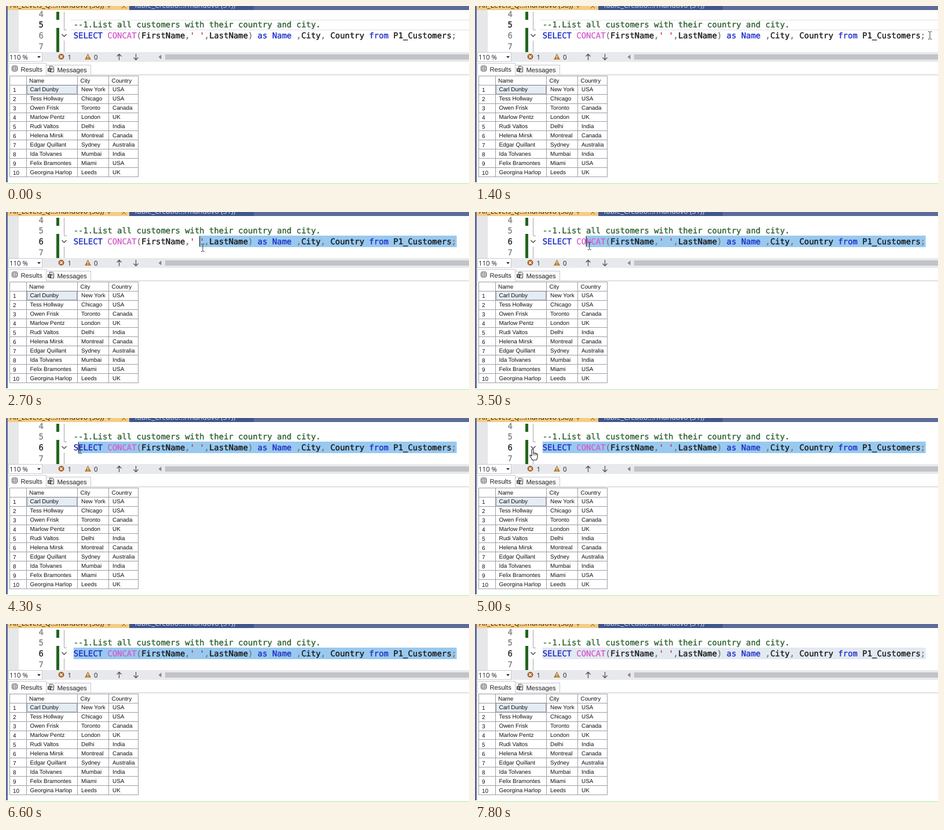
These frames come from a looping animation (800 px wide and 309 px high, 7.9 s). An HTML page:

```html
<!DOCTYPE html>
<html lang="en">
<head>
<meta charset="utf-8">
<title>Query editor</title>
<style>
html, body { margin: 0; width: 100%; height: 100%; overflow: hidden; background: #fff; }
svg { display: block; width: 800px; height: 309px; }
text { white-space: pre; text-rendering: geometricPrecision; }
.code { font: 13.92px "DejaVu Sans Mono", "Noto Sans Mono", monospace; stroke-width: 0.35px; }
.tab { font: 12.4px "Open Sans", "Noto Sans", sans-serif; }
.bar { font: 11.4px "Open Sans", "Noto Sans", sans-serif; fill: #222; }
.grid { font: 9.9px "Liberation Sans", Arial, sans-serif; fill: #111; }
.label { font: 11.2px "Liberation Sans", Arial, sans-serif; fill: #222; }
</style>
</head>
<body>
<svg id="stage" viewBox="0 0 800 309"></svg>
<script>
const LOOP = 7900;
const NS = "http://www.w3.org/2000/svg";
const stage = document.getElementById("stage");
const CODE_X = 116.7, CHAR = 8.38, CODE_END = CODE_X + 79 * CHAR;

function add(tag, attrs, parent = stage) {
  const el = document.createElementNS(NS, tag);
  for (const key in attrs) el.setAttribute(key, attrs[key]);
  parent.appendChild(el);
  return el;
}
const rect = (x, y, width, height, fill, parent) => add("rect", { x, y, width, height, fill }, parent);
const path = (d, stroke, parent, extra) => add("path", { d, stroke, fill: "none", ...extra }, parent);
function text(x, y, str, cls, parent, extra) {
  const el = add("text", { x, y, class: cls, ...extra }, parent);
  el.textContent = str;
  return el;
}
const group = () => add("g", {});
const show = (el, on) => el.setAttribute("visibility", on ? "visible" : "hidden");
function ink(el, color) {
  el.setAttribute("fill", color);
  el.setAttribute("stroke", color);
}

// Editor margin
rect(0, 0, 800, 309, "#ffffff");
rect(3, 7, 19, 73, "#e6e7e8");

const lineFrame = group();
path("M112 24.5H800M112 41.5H800", "#e0e0e5", lineFrame);

const selection = rect(CODE_X, 41, 0, 20, "#99c9ef");

const numbers = [4, 5, 6, 7].map((n, i) => text(56.5, 18.5 + i * 18.8, n, "code"));
rect(87, 10, 5, 14, "#23651f");
rect(87, 38, 5, 42, "#23651f");
path("M100.5 10V41.5H105M100.5 60V80", "#a5a5a5");
path("M96.5 49L100.5 53L104.5 49", "#444", stage, { "stroke-width": 1.3 });

// Code
ink(text(CODE_X, 36.7, "--1.List all customers with their country and city.", "code"), "#2f6130");
const INK = { k: "#1c2cc8", f: "#d45fcb", p: "#777", s: "#c03030", i: "#181818" };
const TOKENS = [
  ["k", "SELECT "], ["f", "CONCAT"], ["p", "("], ["i", "FirstName"], ["p", ","], ["s", "' '"],
  ["p", ","], ["i", "LastName"], ["p", ")"], ["k", " as Name "], ["p", ","], ["i", "City"],
  ["p", ", "], ["i", "Country "], ["k", "from "], ["i", "P1_Customers"], ["p", ";"]
];
const query = add("text", { x: CODE_X, y: 55.6, class: "code" });
for (const [kind, word] of TOKENS) {
  const span = add("tspan", {}, query);
  span.textContent = word;
  ink(span, INK[kind]);
}
const caret = rect(0, 42, 1.2, 18, "#222");

// Document tabs
rect(0, 0, 800, 7, "#5d6b99");
rect(0, 0, 3, 306, "#5d6b99");

function tabs(title, shift) {
  const g = group();
  rect(3, 0, 210 - shift, 7, "#f5cc84", g);
  rect(213 - shift, 0, 215, 7, "#40568d", g);
  text(7, 3, title, "tab", g, { fill: "#2a2418" });
  text(221 - shift, 3, "Table_Creatio...rmandovo (51))", "tab", g, { fill: "#d9deea" });
  path("M175 0H181M178 0V4", "#5c4a28", g);
  const x = 200 - shift * 0.75;
  path(`M${x} -3L${x + 7} 4M${x + 7} -3L${x} 4`, "#5c4a28", g);
  return g;
}
const idleTabs = tabs("All_Levels_Q...mandovo (58))", 0);
const busyTabs = tabs("All_Levels_Qu... Executing...", 8);

// Status strip
rect(3, 80, 797, 17, "#e8e9ed");
add("rect", { x: 4.5, y: 80.5, width: 58, height: 16, fill: "#fff", stroke: "#c4c8d0" });
text(6, 92.6, "110 %", "bar");
add("path", { d: "M54 87H60L57 90.5Z", fill: "#333" });
add("circle", { cx: 95.5, cy: 88, r: 5, fill: "#a8622a" });
path("M93.3 85.8L97.7 90.2M97.7 85.8L93.3 90.2", "#fff", stage, { "stroke-width": 1.4 });
text(106.5, 92.6, "1", "bar");
add("path", { d: "M141.5 82.5L147 93H136Z", fill: "#b08030" });
path("M141.5 86V89.5M141.5 90.5V92", "#fff", stage, { "stroke-width": 1.2 });
text(152, 92.6, "0", "bar");
path("M195.5 94V83.5M191.5 87.5L195.5 83.5L199.5 87.5M224.5 83V93.5M220.5 89.5L224.5 93.5L228.5 89.5", "#555", stage, { "stroke-width": 1.3 });
add("path", { d: "M268.5 84.5V92.5L263.5 88.5Z", fill: "#858585" });
rect(275, 84, 525, 9, "#c2c3c7");

// Result tabs
const pane = rect(3, 97, 797, 211, "#fff");
path("M69 119.5H800", "#c6c6cc");
add("rect", { x: 69.5, y: 102.5, width: 77, height: 17, fill: "#fafafa", stroke: "#c9c9cf" });
add("path", { d: "M4.5 120V99.5H69.5V120", fill: "#fff", stroke: "#c9c9cf" });
add("rect", { x: 10.5, y: 104, width: 9, height: 9, rx: 2, fill: "#fff", stroke: "#444" });
path("M10.5 107H19.5M10.5 110H19.5M13.5 104V113M16.5 104V113", "#666", stage, { "stroke-width": 0.8 });
text(25.5, 113.5, "Results", "label");
path("M75.5 104.5H80.5L82.5 106.5V114.5H75.5ZM77 108H81M77 110H81", "#444");
rect(72, 108, 6, 6, "#444");
path("M73.5 110H76.5M73.5 112H76.5", "#fff");
text(88.5, 115, "Messages", "label");

// Result grid
const ROWS = [
  ["Carl Dunby", "New York", "USA"], ["Tess Hollway", "Chicago", "USA"],
  ["Owen Frisk", "Toronto", "Canada"], ["Marlow Pentz", "London", "UK"],
  ["Rudi Valtos", "Delhi", "India"], ["Helena Mirsk", "Montreal", "Canada"],
  ["Edgar Quillant", "Sydney", "Australia"], ["Ida Tolvanes", "Mumbai", "India"],
  ["Felix Bramontes", "Miami", "USA"], ["Georgina Harlop", "Leeds", "UK"]
];
const table = group();
rect(36, 137, 87, 15, "#e4ecf4", table);
let lines = "";
for (let i = 0; i < 12; i++) lines += `M6 ${Math.round(120.7 + i * 15.95) + 0.5}H229`;
for (const x of [6.5, 35.5, 123.5, 177.5, 228.5]) lines += `M${x} 121V297`;
path(lines, "#9c9ca6", table);
path("M36.5 137.5H122.5V152.5H36.5Z", "#555", table, { "stroke-dasharray": "1 1" });
const COLS = [41.5, 130, 184];
["Name", "City", "Country"].forEach((name, i) => text(COLS[i] - 1.5, 132.8, name, "grid", table));
ROWS.forEach((row, r) => {
  const y = 148.2 + r * 16;
  text(12, y + 0.6, r + 1, "grid", table);
  row.forEach((cell, c) => text(COLS[c], y, cell, "grid", table));
});
rect(0, 308, 800, 1, "#a9e8a0");

// Pointers
const beam = group();
path("M-3 -6.5H-1L0 -5.5L1 -6.5H3M0 -5.5V5.5M-3 6.5H-1L0 5.5L1 6.5H3", "#333", beam);
const hand = group();
add("path", {
  d: "M-2 -7Q-.5 -9 1 -7V-1Q2.5 -2.3 3.6 -.6Q5 -1.6 6 0Q7.8 -.6 8 1.5V5Q8 8 6 11H-1Q-2 8 -5 4.5Q-6 2.5 -4 2.5L-2 4Z",
  fill: "#fff", stroke: "#222", "stroke-width": 1.1, "stroke-linejoin": "round"
}, hand);
path("M1 -1V3M3.6 -.6V3M6 0V3", "#222", hand, { "stroke-width": 0.8 });

// time, x, y
const MOVES = [
  [900, 800, 36], [1200, 786, 51], [1800, 786, 51], [2250, 590, 57], [2700, 340, 62],
  [3300, 215, 60], [4300, 128, 55], [4600, 116, 55], [5000, 100, 62], [6000, 100, 62]
];
function pointer(t) {
  const next = MOVES.findIndex(m => m[0] > t);
  if (next < 1) return null;
  const a = MOVES[next - 1], b = MOVES[next];
  const k = (t - a[0]) / (b[0] - a[0]);
  return [a[1] + (b[1] - a[1]) * k, a[2] + (b[2] - a[2]) * k];
}

function draw(t) {
  t = Math.floor(t / 100) * 100;
  const at = pointer(t);
  const selecting = t >= 1800;
  const busy = t >= 5500 && t < 6000;
  const dim = busy || t >= 7300;
  const onMargin = t >= 4700;

  show(beam, at && !onMargin);
  show(hand, at && onMargin);
  if (at) (onMargin ? hand : beam).setAttribute("transform", `translate(${at[0]} ${at[1]})`);

  const col = at && !onMargin ? Math.floor((at[0] - CODE_X) / CHAR) : 0;
  const start = CODE_X + Math.max(0, Math.min(79, col)) * CHAR;
  selection.setAttribute("x", start);
  selection.setAttribute("width", selecting ? CODE_END - start : 0);
  selection.setAttribute("fill", dim ? "#e3e9f1" : "#99c9ef");
  caret.setAttribute("x", start - 0.5);
  show(caret, selecting && t < 4600);

  show(lineFrame, !selecting);
  const active = selecting ? 2 : 1;
  numbers.forEach((n, i) => ink(n, i === active ? "#222" : "#808080"));

  show(idleTabs, !busy);
  show(busyTabs, busy);
  show(table, !busy);
  pane.setAttribute("fill", busy ? "#f8f8fd" : "#fff");
}

const begin = performance.now();
function tick() {
  draw((performance.now() - begin) % LOOP);
  requestAnimationFrame(tick);
}
tick();
</script>
</body>
</html>
```
